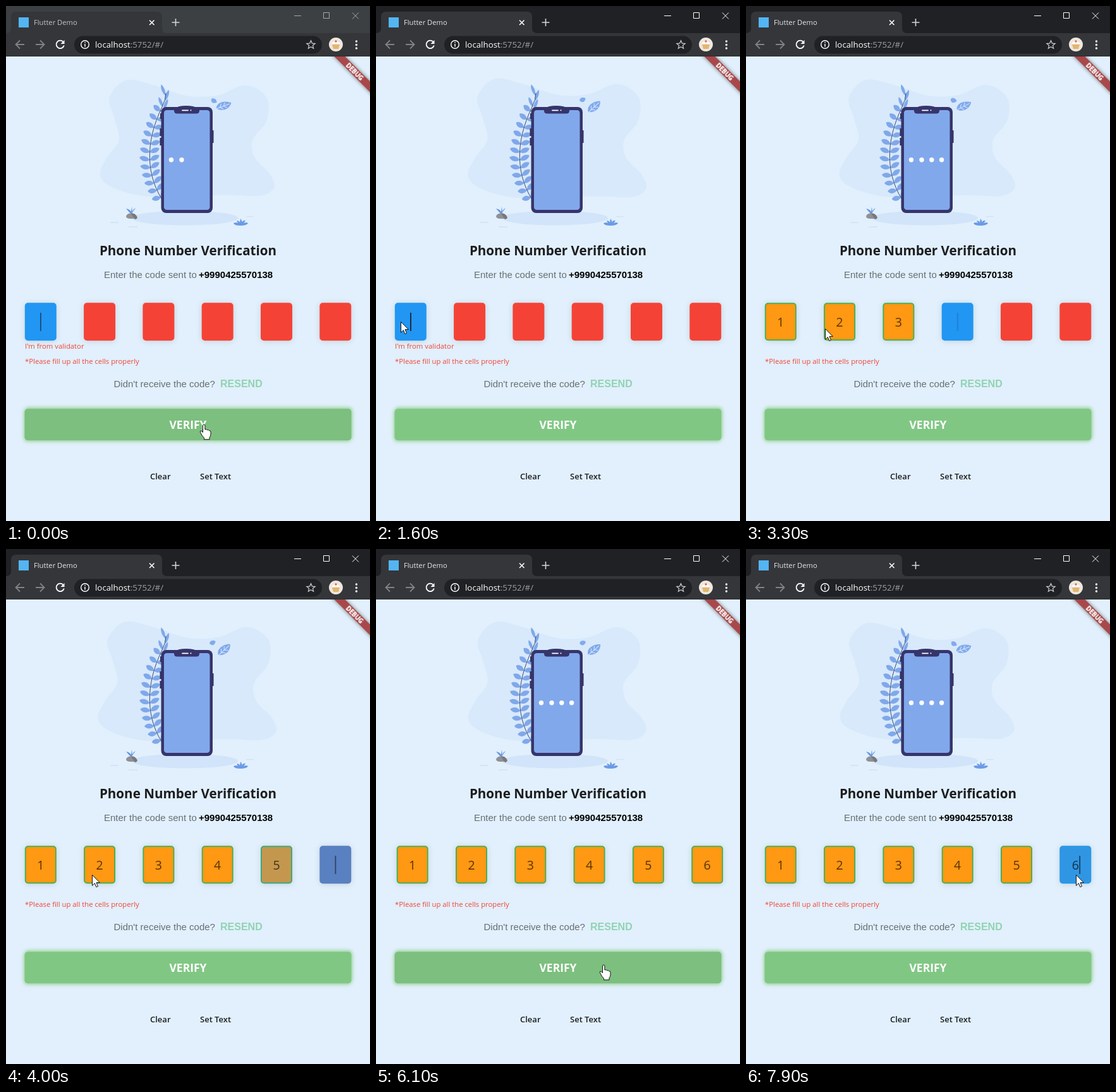
An HTML page for the animation above (8000 ms loop, 576 px wide and 816 px high).

```html
<!DOCTYPE html>
<html lang="en">
<head>
<meta charset="utf-8">
<title>Phone Number Verification</title>
<style>
  html, body { margin: 0; width: 100%; height: 100%; overflow: hidden; background: #e1f0fc; }
  svg { display: block; }
  .ui { font-family: "Open Sans", "Noto Sans", sans-serif; }
  .arial { font-family: "Liberation Sans", Arial, sans-serif; font-size: 15px; }
  .b { font-weight: 700; }
  .soft { fill: rgba(0, 0, 0, .54); }
  .error { fill: #f44336; font-size: 11.3px; }
  .line { fill: none; stroke: #fff; }
  .cell { stroke-width: 2; filter: drop-shadow(0 1px 5px rgba(0, 0, 0, .12)); }
  .button { filter: drop-shadow(1px -2px 2.5px #a5d6a7) drop-shadow(-1px 2px 2.5px #a5d6a7); }
  .ribbon { filter: drop-shadow(0 0 3px rgba(0, 0, 0, .5)); }
</style>
</head>
<body>
<svg width="576" height="816" viewBox="0 0 576 816">
  <rect width="576" height="816" fill="#e1f0fc"/>

  <!-- illustration -->
  <path id="blob" fill="#d8e9fc"/>
  <ellipse cx="283" cy="336" rx="84" ry="11.5" fill="#d2e4fa"/>
  <path d="M165 343h13M380 333.5h12M194 350h14" stroke="#d2e2f5" stroke-width="1.5"/>
  <g id="branch" fill="#80a8ea"></g>
  <g id="phone">
    <path d="M244 170h4v9h-4zM243.5 194h4v12h-4zM243.5 209h4v12h-4zM325 197h3.5v20H325z" fill="#302f60"/>
    <rect x="245.5" y="160" width="81.5" height="168" rx="8" fill="#36356b"/>
    <path d="M268 162q4-4 17-4t18 4z" fill="#36356b"/>
    <rect x="250" y="165" width="72.5" height="158" rx="4.5" fill="#82a8ec"/>
    <path d="M264 163h44q-2 1-2 3q0 4.5-5 4.5h-30q-5 0-5-4.5q0-2-2-3z" fill="#36356b"/>
    <path d="M279 165.3h9" stroke="#fff" stroke-width="1.8" stroke-linecap="round"/>
    <circle cx="292.5" cy="165.3" r="1" fill="#fff"/>
  </g>
  <g id="dots" fill="#fff"></g>
  <g id="leaf">
    <path d="M-12 2C-10-8 4-9 13-3C8 7-4 9-12 2z" fill="#82aaec"/>
    <path d="M-13 3L10-2M-6 1l3-5M-6 1l5 4M0 0l3-5M0 0l5 3.5" class="line" style="stroke:#d8e8fc"/>
  </g>
  <path id="bud" d="M-5 0C-4-5 2-5 5-2C3 4-2 5-5 0z" fill="#82aaec"/>
  <path d="M198 330l-8-9q6 1 8 5l1-8 1 8q1-4 5-6z" fill="#6595e4"/>
  <path d="M190 333q2-5 8-4.5q4-1 8 3q4 5 0 5.5h-9q-7 0-7-4z" fill="#909196"/>
  <path d="M198 329q6-1 9 5q1 4-3 4z" fill="#77787e"/>
  <path d="M360 344q5-2 7 0l-2-4q4 0 5 3l1-6q3 3 2 6q2-4 6-3l-3 4q4-2 7 0q-2 4-12 4t-11-4z" fill="#6c9ae6"/>

  <!-- page text -->
  <g class="ui">
    <text x="288" y="395" text-anchor="middle" class="b" font-size="20.6" fill="#1c1d20">Phone Number Verification</text>
    <text id="validator" x="30" y="543" class="error">I'm from validator</text>
    <text x="30" y="567" class="error">*Please fill up all the cells properly</text>
  </g>
  <g class="arial">
    <text x="155" y="431" class="soft">Enter the code sent to</text>
    <text x="305" y="431" class="b">+9990425570138</text>
    <text x="170.5" y="604" class="soft">Didn't receive the code?</text>
    <text x="339" y="604" class="b" font-size="16" style="fill:#91d3b3">RESEND</text>
  </g>
  <g id="cells" class="ui" font-size="19.5" text-anchor="middle"></g>
  <rect id="caret" y="486" width="1.8" height="29" fill="#15161a"/>

  <rect id="verify" class="button" x="29.5" y="638.3" width="517" height="50" rx="5"/>
  <g class="ui">
    <text x="288" y="670" text-anchor="middle" class="b" font-size="17.5" fill="#fff">VERIFY</text>
    <g font-size="13" font-weight="600" fill="#1c1d20">
      <text x="228" y="750">Clear</text>
      <text x="307" y="750">Set Text</text>
    </g>
  </g>

  <svg y="80" width="576" height="80">
    <g class="ribbon" transform="translate(552 24) rotate(45)">
      <path d="M-50-6H50V6H-50z" fill="#a9484a"/>
      <text class="ui b" y="3.6" font-size="9.8" text-anchor="middle" fill="#fff" stroke="#fff" stroke-width=".3">DEBUG</text>
    </g>
  </svg>

  <!-- browser window -->
  <rect id="frame" width="576" height="44"/>
  <path d="M0 43q8 0 8-8V17q0-8 8-8h223q8 0 8 8v18q0 8 8 8H576v37H0z" fill="#35363a"/>
  <path d="M0 79.5h576" stroke="#2b2c30"/>
  <rect x="20" y="18" width="16" height="16" fill="#54b5f5"/>
  <text id="tab" class="ui" x="44" y="30" font-size="11.2">Flutter Demo</text>
  <path d="M227 22.5l7.5 7.5m0-7.5l-7.5 7.5" class="line" stroke-width="1.6"/>
  <path d="M262.5 26h12M268.5 20v12" class="line" stroke-width="1.6" style="stroke:#d5d6d8"/>
  <g id="controls" class="line">
    <path d="M456 15.5h11M502.5 10.5h9v9h-9zM548 10.5l10 10m0-10l-10 10"/>
  </g>
  <rect x="108" y="47.5" width="392" height="28" rx="14" fill="#202124"/>
  <g class="line" stroke-width="1.8">
    <path d="M29 61H16m6-6.5L15.5 61l6.5 6.5M47 61h13m-6-6.5l6.5 6.5-6.5 6.5" style="stroke:#808286"/>
    <path d="M90.8 57.2a6.2 6.2 0 1 0 1 5.3"/>
    <circle cx="125" cy="61" r="6.3" stroke-width="1.4"/>
    <path d="M125 60v4.5M125 57v1.6" stroke-width="1.5"/>
    <path d="M482.5 54.8l1.9 4.3 4.7.4-3.6 3.1 1.1 4.6-4.1-2.5-4.1 2.5 1.1-4.6-3.6-3.1 4.7-.4z" stroke-width="1.3" style="stroke:#c6c8cb"/>
  </g>
  <path d="M92.5 54v6h-6z" fill="#fff"/>
  <text class="ui" x="141" y="66" font-size="13.3" fill="#fff">localhost<tspan fill="#9aa0a6">:5752/#/</tspan></text>
  <circle cx="522" cy="61" r="11" fill="#efe7de"/>
  <path d="M515 60q7-9 14 0z" fill="#fff"/>
  <path d="M516 61h12l-2 7h-8z" fill="#e3b66d"/>
  <circle cx="522" cy="56" r="1.7" fill="#d8685c"/>
  <g fill="#fff"><circle cx="554.5" cy="56" r="1.7"/><circle cx="554.5" cy="61.5" r="1.7"/><circle cx="554.5" cy="67" r="1.7"/></g>

  <!-- pointer -->
  <path id="arrow" d="M.5.5v16.8l3.9-3.7 2.5 6 2.6-1.1-2.5-5.9h5.4z" fill="#fff" stroke="#111"/>
  <path id="hand" d="M-1.5 2q0-2 1.7-2t1.7 2v6q3-1 3.3.8q2.8-.8 3.2 1q2.6-.4 2.6 2v4q0 2.5-2 5v3h-8.5v-2.5q-3.500-3-5-7q-2-3-1-3.8q1.6-1 4 2z" fill="#fff" stroke="#111"/>
</svg>

<script>
const LOOP = 8000, STEP = 100, FADE = 300, PULSE = 2400;
const RED = [244, 67, 54], BLUE = [33, 150, 243], ORANGE = [255, 152, 18], GREEN = [76, 175, 80];
const TYPED = [2040, 2340, 2880, 3330, 3780, 4230];
const REFOCUS = 7620, SHAKE = 5770, ACTIVE = 700;
// time, x, y of the pointer tip
const POINTER = [
  [0, 313, 663], [300, 313, 663], [900, 58, 518], [1400, 39, 500], [2100, 39, 500],
  [2600, 104, 500], [3100, 122, 509], [4000, 136, 516], [5100, 136, 516], [5500, 360, 655],
  [5600, 360, 659], [6200, 360, 659], [6600, 292, 621], [7200, 510, 511], [7900, 522, 516]
];
const BLOB = [
  [190, 117], [237, 126], [287, 142], [335, 141], [380, 125], [413, 145], [413, 182], [391, 212],
  [394, 240], [418, 266], [425, 288], [404, 301], [355, 300], [290, 301], [220, 302], [168, 288],
  [148, 268], [159, 240], [178, 212], [171, 178], [163, 145]
];

const $ = id => document.getElementById(id);
const clamp = v => Math.min(1, Math.max(0, v));
const ramp = (t, start, span) => clamp((t - start) / span);
const mix = (a, b, k) => a.map((v, i) => v + (b[i] - v) * k);
const rgb = c => `rgb(${c.map(Math.round)})`;
const show = (el, on) => el.setAttribute("visibility", on ? "visible" : "hidden");

function add(parent, tag, attrs, text = "") {
  const el = document.createElementNS("http://www.w3.org/2000/svg", tag);
  for (const k in attrs) el.setAttribute(k, attrs[k]);
  el.textContent = text;
  return parent.appendChild(el);
}

// closed smooth curve through the points
function smooth(pts) {
  const n = pts.length, at = i => pts[(i + n) % n];
  let d = `M${pts[0]}`;
  for (let i = 0; i < n; i++) {
    const [a, b, c, e] = [at(i - 1), at(i), at(i + 1), at(i + 2)];
    d += `C${b.map((v, k) => v + (c[k] - a[k]) / 6)} ${c.map((v, k) => v - (e[k] - b[k]) / 6)} ${c}`;
  }
  return d + "z";
}

function buildBranch() {
  const g = $("branch");
  const leaf = (x, y, len, w, deg) => add(g, "path", {
    d: `M0 0C${len * .3} ${-w} ${len * .75} ${-w} ${len} 0C${len * .75} ${w} ${len * .3} ${w} 0 0z`,
    transform: `translate(${x} ${y}) rotate(${deg})`
  });
  const bez = (a, b, c, d, t) => {
    const u = 1 - t;
    return u * u * u * a + 3 * u * u * t * b + 3 * u * t * t * c + t * t * t * d;
  };
  const spot = t => [bez(252, 220, 220, 247, t), bez(314, 270, 215, 160, t)];
  for (let i = 0; i < 12; i++) {
    const t = .08 + i * .08, [x, y] = spot(t), [nx, ny] = spot(t + .01);
    const dir = Math.atan2(ny - y, nx - x) * 180 / Math.PI;
    const len = 17 - Math.abs(i - 5) * .5;
    leaf(x, y, len, 5.2, dir - 72);
    leaf(x, y, len, 5.2, dir + 66);
  }
  for (const [x, y, len, deg] of [[252, 142, 19, -110], [252, 150, 18, -72], [248, 160, 17, -112], [249, 165, 19, -68]])
    leaf(x, y, len, 3.2, deg);
  add(g, "path", { d: "M252 314C220 270 220 215 247 160Q253 148 253 138", fill: "none", stroke: "#3c4c74" });
}

const cells = TYPED.map((_, i) => {
  const x = 29.8 + i * 93.3;
  return {
    x,
    box: add($("cells"), "rect", { class: "cell", x: x + 1, y: 471.3, width: 48, height: 58, rx: 4 }),
    digit: add($("cells"), "text", { x: x + 25, y: 508, fill: "rgba(0,0,0,.66)" }, i + 1)
  };
});
const dots = [261.5, 278, 293.8, 309.6].map(cx => add($("dots"), "circle", { cx, cy: 243.8 }));
$("blob").setAttribute("d", smooth(BLOB));
buildBranch();

function shakeOffset(t) {
  const k = 1 - Math.abs(t - SHAKE - 500) / 500;
  return k <= 0 ? 0 : -51.6 * 2 ** (10 * (k - 1)) * Math.sin((k - 1.1) * 5 * Math.PI);
}

function drawArt(t) {
  const p = t % PULSE;
  const s = Math.cos((p - 1550) / PULSE * 2 * Math.PI);
  $("blob").setAttribute("transform", `translate(287 210) scale(${1.003 + s * .0147}) translate(-287 -210)`);
  $("leaf").setAttribute("transform", `translate(${344.6 + s * .6} ${159 + s}) rotate(${-17 - s * 14})`);
  $("bud").setAttribute("transform", `translate(${328 - s} ${150 - s}) rotate(${25 - s * 35})`);
  dots.forEach((dot, i) => {
    const age = (p - 1770 - i * 400 + 2 * PULSE) % PULSE;
    const life = 2100 - i * 400;
    dot.setAttribute("r", 3.7 * ramp(age, 0, 120) * (1 - ramp(age, life - 100, 100)));
  });
}

function drawCells(t) {
  cells.forEach(({ box, digit }, i) => {
    const focus = i ? ramp(t, TYPED[i - 1], FADE) : 1;
    const full = ramp(t, TYPED[i], FADE);
    const back = i === 5 ? ramp(t, REFOCUS, FADE) : 0;
    const base = mix(RED, BLUE, focus);
    box.setAttribute("fill", rgb(mix(mix(base, ORANGE, full), BLUE, back)));
    box.setAttribute("stroke", rgb(mix(mix(base, GREEN, full), BLUE, back)));
    digit.setAttribute("opacity", ramp(t, TYPED[i], FADE / 2));
  });
  $("cells").setAttribute("transform", `translate(${shakeOffset(t)} 0)`);

  const next = TYPED.findIndex(at => t < at);
  const refocused = t >= REFOCUS;
  const beat = ((t + 600) % 1000) / 1000;
  const caret = $("caret");
  show(caret, next >= 0 || refocused);
  caret.setAttribute("x", refocused ? cells[5].x + 31 : cells[Math.max(0, next)].x + 24.2);
  caret.setAttribute("opacity", 1 - beat ** 1.65);
  show($("validator"), t < TYPED[2]);
}

function drawPointer(t) {
  let i = POINTER.length - 1;
  while (POINTER[i][0] > t) i--;
  const a = POINTER[i], b = POINTER[i + 1] || a;
  const [, x, y] = mix(a, b, b === a ? 0 : ramp(t, a[0], b[0] - a[0]));
  const over = y > 638 && y < 688 && x > 30 && x < 546;
  for (const id of ["arrow", "hand"])
    $(id).setAttribute("transform", `translate(${Math.round(x)} ${Math.round(y)})`);
  show($("hand"), over);
  show($("arrow"), !over);
  const hover = t < 500 || (t >= 5500 && t < 6700);
  $("verify").setAttribute("fill", hover ? "#7cbf7f" : "#81c784");
}

function drawWindow(t) {
  const on = t >= ACTIVE;
  $("frame").setAttribute("fill", on ? "#202124" : "#3c4043");
  $("tab").setAttribute("fill", on ? "#e4e5e8" : "#c3c5c8");
  $("controls").setAttribute("opacity", on ? 1 : .55);
}

const start = performance.now();
function tick(now) {
  const t = Math.floor(Math.max(0, now - start) % LOOP / STEP) * STEP;
  drawArt(t);
  drawCells(t);
  drawPointer(t);
  drawWindow(t);
  requestAnimationFrame(tick);
}
tick(start);
</script>
</body>
</html>
```
